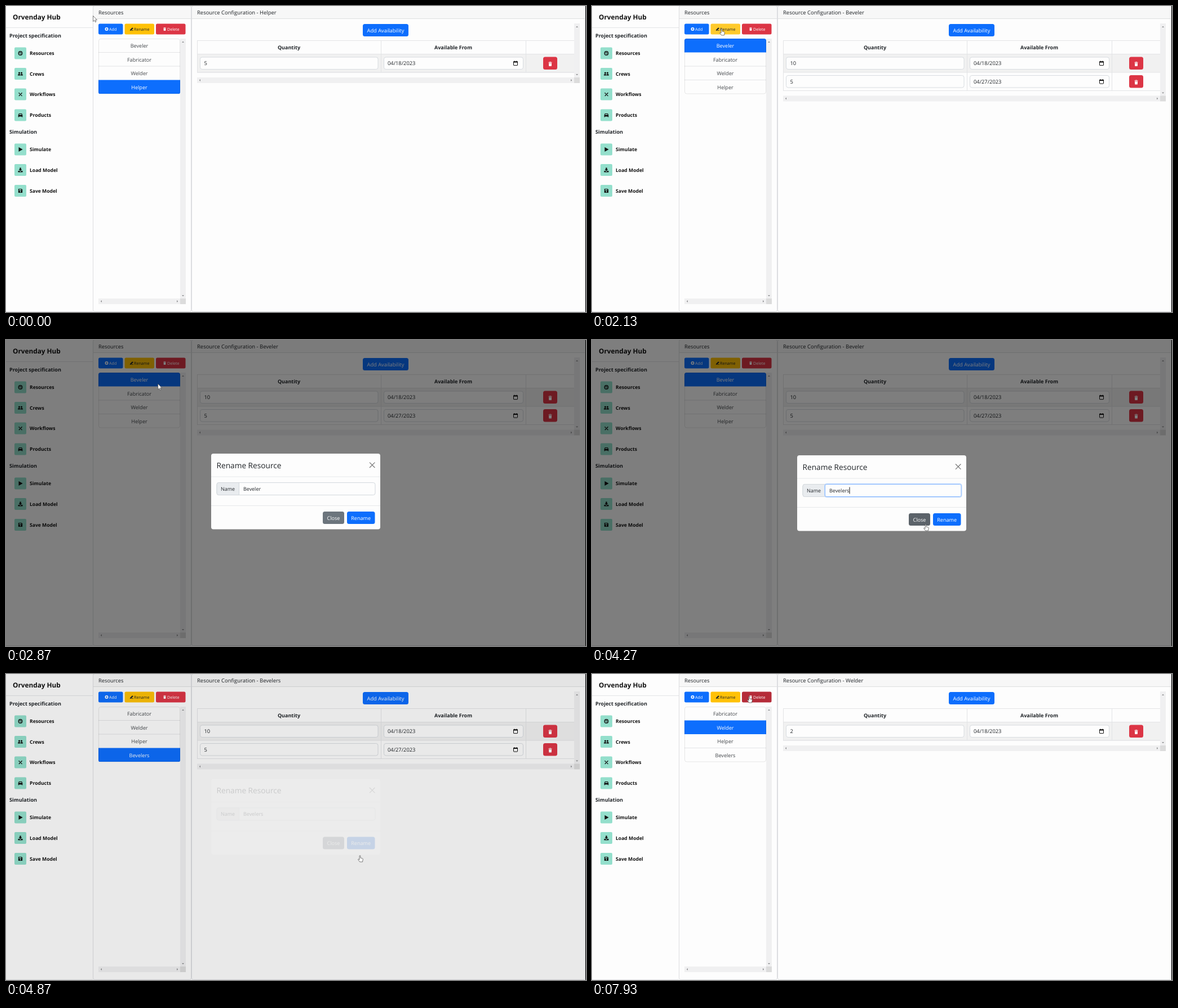
An HTML page for the animation above (8000 ms loop, 1029 by 544 pixels).

```html
<!DOCTYPE html>
<html lang="en">
<head>
<meta charset="utf-8">
<title>Resource editor</title>
<style>
html, body { margin: 0; width: 100%; height: 100%; overflow: hidden; background: #fdfdfd; }
svg { display: block; width: 100%; height: 100%; }
text { font-family: "Open Sans", "Noto Sans", sans-serif; text-rendering: geometricPrecision; white-space: pre; }
</style>
</head>
<body>
<svg id="stage" viewBox="0 0 1029 544"></svg>
<script>
const LOOP = 8000;
const SELECT_FIRST = 1200, OPEN = 2656, FOCUS = 3370, TYPE = 3900, CLOSE = 4744, SELECT_LAST = 6900;
const INK = '#212529', LINE = '#e3e4e6', BLUE = '#0d6efd', RED = '#dc3545', PAPER = '#fdfdfd';

// Drawing helpers; text is placed by its vertical centre.
const rect = (x, y, w, h, fill, r = 0, stroke = 'none') =>
  `<rect x="${x}" y="${y}" width="${w}" height="${h}" rx="${r}" fill="${fill}" stroke="${stroke}"/>`;
const path = (d, fill = 'none', stroke = 'none', width = 1) =>
  `<path d="${d}" fill="${fill}" stroke="${stroke}" stroke-width="${width}"/>`;
const line = (d, color = LINE) => path(d, 'none', color);
const text = (x, y, size, label, { fill = INK, weight = 400, anchor = 'start' } = {}) =>
  `<text x="${x}" y="${y + size * 0.36}" font-size="${size}" font-weight="${weight}" fill="${fill}" text-anchor="${anchor}">${label}</text>`;
const at = (x, y, body, scale = 1) => `<g transform="translate(${x} ${y}) scale(${scale})">${body}</g>`;
const middle = { anchor: 'middle' };
const boldMiddle = { anchor: 'middle', weight: 700 };

const clamp = v => Math.max(0, Math.min(1, v));
const easeOut = v => Math.sin(clamp(v) * Math.PI / 2);
const smooth = v => v * v * (3 - 2 * v);

const trash = color => path('M-3-3.2h1.8l.5-.8h1.4l.5.8H3v1H-3zM-2.6-1.6h5.2L2.3 4h-4.6z', color);
const pen = path('M-3 3l.5-2L1.3-2.8 3-1.2-.8 2.4zM0 2.3h3V3H-.6z', INK);
const plus = '<circle r="3" fill="#fff"/>' + path('M-1.7 0h3.4M0-1.7v3.4', 'none', BLUE);
const calendar = rect(-3.5, -3, 7, 6.6, 'none', 0.6, '#111') + path('M-4-3.5h8v2h-8zM-2.5-4.5h1v1h-1zM1.5-4.5h1v1h-1z', '#111');

const icons = {
  Resources: '<circle r="3.3" fill="none" stroke="#111" stroke-width="1.2"/>' +
    path('M-2.2-2.2L1-1.5 1.6 1-.4 2.2M1-1.5L2.4-2.4M-3 .5L-.5-.6', 'none', '#111', 0.9),
  Crews: '<circle cx="-2" cy="-1.6" r="1.5"/><circle cx="2" cy="-1.6" r="1.5"/>' +
    path('M-4.4 3V1.8Q-4.2.4-2.2.4T-.2 1.8V3zM.3 3V1.8Q.4.4 2.2.4T4.4 1.8V3z', '#111'),
  Workflows: path('M-2.6 3L3-2.8M-.8-.6L-2.9-2.8M1 1.2L3 3', 'none', '#111', 1.3),
  Products: path('M-3.8 0L-2.6-3H2.6L3.8 0V3.5H2.4V2.4H-2.4V3.5H-3.8zM-2.5-.4h5L1.9-2h-3.8z', '#111'),
  Simulate: path('M-3-4L4.2 0-3 4z', '#111'),
  'Load Model': path('M-1.2-4h2.4v3H3L0 2-3-1h1.8zM-4 1.6h2L0 3.2 2 1.6h2V4h-8z', '#111'),
  'Save Model': path('M-3.6-3.6H2.2L3.6-2.2V3.6H-3.6z', '#111') +
    rect(-2.3, -2.5, 4, 1.7, '#94dfcc') + '<circle cy="1.4" r="1.1" fill="#94dfcc"/>'
};
const iconRows = [84, 120.5, 157, 194, 255, 291.5, 328.5];

function scrollbars(x, y, right, bottom) {
  const arrow = (cx, cy, angle) =>
    `<path d="M-2 1L0-1.2 2 1z" fill="#8f9092" transform="translate(${cx} ${cy}) rotate(${angle})"/>`;
  return rect(right - 10, y, 10, bottom - y - 10, '#f0f0f1') +
    rect(x, bottom - 10, right - x - 10, 10, '#f0f0f1') +
    rect(right - 10, bottom - 10, 10, 10, '#dcdcdc') +
    arrow(right - 5, y + 6, 0) + arrow(right - 5, bottom - 15, 180) +
    arrow(x + 5, bottom - 5, -90) + arrow(right - 15, bottom - 5, 90);
}

const sidebar =
  text(12, 20, 11.8, 'Orvenday Hub', { weight: 700, fill: '#111' }) +
  line('M0 38.5H154') +
  text(6, 52.5, 9.05, 'Project specification', { weight: 700 }) +
  text(6, 223.5, 9.05, 'Simulation', { weight: 700 }) +
  Object.entries(icons).map(([name, icon], i) =>
    rect(15, iconRows[i] - 10.5, 21, 21, '#94dfcc', 2) + at(25.5, iconRows[i], icon) +
    text(42, iconRows[i], 8.6, name, { weight: 700, fill: '#111' })).join('');

const panel = (x, right) =>
  rect(x, 0, right - x, 22, '#f7f7f7') + line(`M${x} 22.5H${right}`, '#dedfe0') +
  rect(x + 0.5, -0.5, right - x - 1, 544, 'none', 3, '#dcdde0');

const frame = '<clipPath id="list"><rect x="164" y="58" width="145" height="98.5" rx="3.5"/></clipPath>' +
  rect(0, 0, 1029, 544, PAPER) + sidebar + line('M0 543.5H154') +
  panel(154, 329) + panel(329, 1028) + text(164, 11.5, 9.3, 'Resources') +
  scrollbars(164, 58, 319, 530) +
  rect(633, 32, 81, 22, BLUE, 3.5) + text(673.5, 43.5, 9.3, 'Add Availability', { fill: '#fff', ...middle });

function stateAt(t) {
  const before = ['Beveler', 'Fabricator', 'Welder', 'Helper'];
  const after = ['Fabricator', 'Welder', 'Helper', 'Bevelers'];
  const first = '04/18/2023';
  const two = [[10, first], [5, '04/27/2023']];
  if (t < SELECT_FIRST) return { items: before, selected: 'Helper', rows: [[5, first]] };
  if (t < CLOSE) return { items: before, selected: 'Beveler', rows: two };
  if (t < SELECT_LAST) return { items: after, selected: 'Bevelers', rows: two };
  return { items: after, selected: 'Welder', rows: [[2, first]] };
}

function list({ items, selected }) {
  const height = 24.5;
  return items.map((name, i) => {
    const y = 58 + i * height, on = name === selected;
    return (on ? `<g clip-path="url(#list)">${rect(164, y, 145, height, BLUE)}</g>` : '') +
      (i && !on && items[i - 1] !== selected ? line(`M164 ${y}H309`) : '') +
      text(236.5, y + 13.2, 9.1, name, { fill: on ? '#fff' : '#43474b', ...middle });
  }).join('') + rect(164.5, 58.5, 144, 97.5, 'none', 3.5, 'rgba(0,0,0,.09)');
}

function table({ rows }) {
  const bottom = 85.5 + rows.length * 32.5;
  return rect(339, 85, 669, 33, '#f1f1f1') +
    line(`M339 61.5H1008M339 85.5H1008M339 118H1008M339 ${bottom}H1008M339.5 61V${bottom}M665.5 61V${bottom}M922.5 61V${bottom}`) +
    text(502, 74, 9, 'Quantity', boldMiddle) + text(793.5, 74, 9, 'Available From', boldMiddle) +
    rows.map(([quantity, date], i) => at(0, i * 32.5,
      rect(344.5, 91, 315.5, 21.5, PAPER, 3.5, '#d8dce0') + text(351.5, 102, 9.3, quantity) +
      rect(670.5, 91, 247, 21.5, PAPER, 3.5, '#d8dce0') + text(677, 102, 9.3, date) +
      at(904, 102, calendar) + rect(953, 90.5, 25, 22.5, RED, 3.5) + at(965.5, 103, trash('#fff')))).join('') +
    scrollbars(339, 31, 1018, bottom + 19);
}

function toolbar(hover) {
  return rect(164, 31.5, 43.5, 19, hover === 'add' ? '#0b5ed7' : BLUE, 2.5) + at(178.5, 41, plus) +
    text(183, 41, 7.15, 'Add', { fill: '#fff' }) +
    rect(210.5, 31.5, 52.5, 19, hover === 'rename' ? '#ffca2c' : '#ffc107', 2.5) + at(222.8, 41, pen) +
    text(227, 41, 7.15, 'Rename') +
    rect(266, 31.5, 52.5, 19, hover === 'delete' ? '#b52c39' : RED, 2.5) + at(281.5, 41, trash('#fff'), 0.75) +
    text(286, 41, 7.15, 'Delete', { fill: '#fff' });
}

function modal(t, hover) {
  const opacity = clamp((t - OPEN) / 150) - clamp((t - CLOSE) / 150);
  if (opacity <= 0) return '';
  const drop = -30 * (1 - easeOut((t - OPEN) / 300) + easeOut((t - CLOSE) / 300));
  const typed = t >= TYPE;
  const focused = t >= FOCUS && t < CLOSE;
  const glow = focused ? clamp((t - FOCUS) / 150) : 0;
  const caret = focused && (t - (typed ? TYPE : FOCUS)) % 1060 < 530;
  return rect(0, 0, 1028, 544, `rgba(0,0,0,${opacity / 2})`) +
    `<g opacity="${opacity}" transform="translate(0 ${drop})">` +
    rect(364, 205, 300, 134.5, PAPER, 4) + line('M364 246H664M364 297.5H664', '#e6e8ea') +
    text(373.5, 226, 13.7, 'Rename Resource', { weight: 500 }) +
    path('M645 220.5l9.4 9.4M654.4 220.5l-9.4 9.4', 'none', '#777', 1.2) +
    rect(374, 256.5, 281, 22, PAPER, 3.5, '#d3d8dd') +
    path('M377.5 256.5H413.5V278.5H377.5Q374 278.5 374 275V260Q374 256.5 377.5 256.5z', '#e9ecef', '#d3d8dd') +
    (glow ? `<g opacity="${glow}">` + rect(412.5, 255.5, 243.5, 24, 'none', 3, '#c2dbfe') +
      rect(413.5, 256.5, 241.5, 22, PAPER, 2.5, '#86b7fe') + '</g>' : '') +
    text(381, 267.5, 8.95, 'Name') + text(421, 267.5, 8.95, typed ? 'Bevelers' : 'Beveler') +
    (caret ? line(typed ? 'M457 261.5v12' : 'M452.7 261.5v12', '#111') : '') +
    rect(562, 308, 38, 22, hover === 'close' ? '#5c636a' : '#6c757d', 3.5) +
    text(581, 319.5, 9.1, 'Close', { fill: '#fff', ...middle }) +
    rect(605, 308, 49.5, 22, hover === 'confirm' ? '#0b5ed7' : BLUE, 3.5) +
    text(629.7, 319.5, 9.1, 'Rename', { fill: '#fff', ...middle }) + '</g>';
}

// Pointer stops: time, x, y
const stops = [
  [0, 154.5, 17.5], [500, 154.5, 17.5], [1030, 238, 74], [1300, 238, 74], [1970, 230, 45], [2130, 230, 41],
  [2560, 230, 41], [2730, 231.5, 44], [3300, 480, 265], [3900, 480, 265], [4270, 592, 328], [4600, 628, 323],
  [4920, 628, 323], [5530, 256, 140], [6230, 256, 140], [6570, 244, 111.5], [6850, 238, 97], [7370, 238, 97],
  [7900, 279, 40], [LOOP, 279, 40]
];

function pointerAt(t) {
  const i = stops.findIndex(stop => stop[0] > t);
  const [t0, x0, y0] = stops[i - 1], [t1, x1, y1] = stops[i];
  const k = smooth((t - t0) / (t1 - t0));
  return [x0 + (x1 - x0) * k, y0 + (y1 - y0) * k];
}

// Hit areas: name, left, top, right, bottom
const pageAreas = [['add', 164, 31, 208, 51], ['rename', 210, 31, 263, 51], ['delete', 266, 31, 319, 51]];
const modalAreas = [['input', 413, 256, 655, 279], ['close', 562, 308, 600, 330], ['confirm', 605, 308, 655, 330]];

function hoverAt(t, x, y) {
  const areas = t >= OPEN && t < 4950 ? modalAreas : pageAreas;
  const hit = areas.find(([, l, top, r, b]) => x >= l && x <= r && y >= top && y <= b);
  return hit ? hit[0] : null;
}

function pointer(x, y, hover) {
  if (hover === 'input') return at(x, y, path('M-2-5H2M0-5V5M-2 5H2', 'none', '#333', 0.9));
  const shape = hover
    ? 'M-.9 6V.7Q-.8-.3 0-.3T.9.7V4L4.7 5Q5.4 5.3 5.3 6.2L4.5 11H-.3L-3.2 7.2Q-3.6 6.2-2.5 6L-.9 7.2z'
    : 'M0 0V10L2.3 8 3.9 11.2 5.4 10.5 3.9 7.3H7z';
  return at(x, y, path(shape, '#fff', '#444', 0.7));
}

const stage = document.getElementById('stage');
function render() {
  const t = performance.now() % LOOP;
  const [x, y] = pointerAt(t);
  const hover = hoverAt(t, x, y);
  const state = stateAt(t);
  stage.innerHTML = frame + text(339, 11.5, 9.45, `Resource Configuration - ${state.selected}`) +
    toolbar(hover) + list(state) + table(state) + modal(t, hover) +
    rect(1028, 0, 1, 544, '#000') + pointer(x, y, hover);
  requestAnimationFrame(render);
}
render();
</script>
</body>
</html>
```
